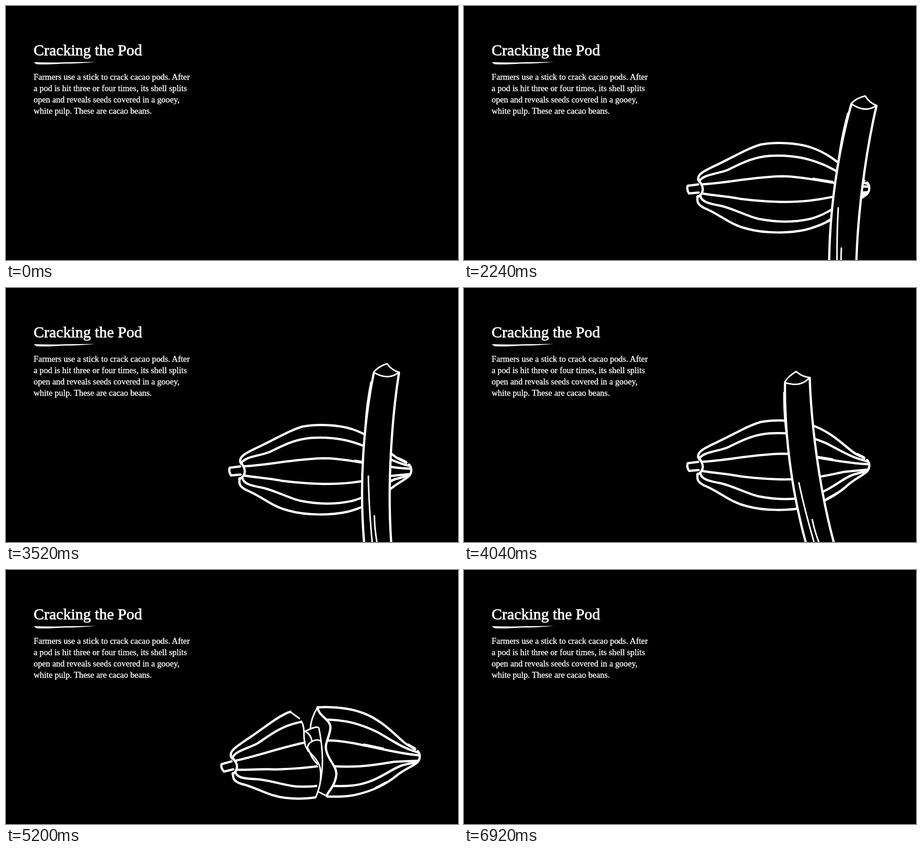
An HTML page that plays this animation: 998 by 561 pixels, repeating every 7480 ms.

```html
<!DOCTYPE html>
<html lang="en">
<head>
<meta charset="utf-8">
<title>Cracking the Pod</title>
<style>
  html, body { margin: 0; height: 100%; overflow: hidden; background: #000; }
  svg { display: block; width: 100vw; height: 100vh; }
  text { fill: #fff; stroke: #fff; stroke-width: .4; font: 18.8px "Liberation Serif", serif; }
  .title { font-size: 34.5px; stroke-width: .9; }
  .ink { fill: none; stroke: #fff; stroke-width: 5; stroke-linecap: round; stroke-linejoin: round; }
  .thin { stroke-width: 3.4; }
  .hair { stroke-width: 2; }
</style>
</head>
<body>
<svg viewBox="0 0 998 561">
  <defs>
    <g id="shell">
      <path d="M519 388C510 372 533 363 560 350C600 331 625 315 655 306C690 300 735 302 765 312C815 328 845 365 866 377L884 386"/>
      <path d="M520 386C530 372 555 372 580 363C610 349 635 334 675 331C730 328 765 338 800 353C830 368 855 385 892 393"/>
      <path d="M524 394C580 391 640 377 703 376C760 377 830 397 892 399"/>
      <path d="M526 414C545 418 580 420 610 426C660 432 700 434 735 432C780 430 810 422 840 416L892 411"/>
      <path d="M522 420C525 434 545 437 570 442C600 450 625 464 650 470C690 478 730 478 765 470C810 458 835 430 860 422L890 414"/>
      <path d="M516 420C514 432 515 438 530 446C565 460 585 482 625 492C665 503 720 502 755 494C800 482 825 464 842 450C860 432 880 425 890 415"/>
      <path d="M517 394L494 397Q491 405 497 414L518 412M517 383Q529 398 527 408Q524 419 515 422M890 390Q897 398 894 408Q892 414 887 417"/>
      <path class="hair" d="M770 380L814 387M868 375L884 383M800 475L824 461"/>
    </g>
    <clipPath id="leftCut">
      <path d="M400 250H627L630 316L652 334L659 380L692 440L684 502V560H400Z"/>
    </clipPath>
    <clipPath id="rightCut">
      <path d="M688 290V303C690 325 720 330 716 352C712 375 702 385 708 402C715 425 732 435 729 455C725 480 710 490 708 499V520H960V290Z"/>
    </clipPath>
  </defs>

  <text class="title" x="61" y="109">Cracking the Pod</text>
  <path fill="#fff" d="M61 124Q95 125.500 130 124.300L199 123.500Q165 127 125 127.300Q90 130 67 128.500Z"/>
  <text x="61" y="163">Farmers use a stick to crack cacao pods. After</text>
  <text x="61" y="188">a pod is hit three or four times, its shell splits</text>
  <text x="61" y="213">open and reveals seeds covered in a gooey,</text>
  <text x="61" y="238">white pulp. These are cacao beans.</text>

  <g id="pod" class="ink"><use href="#shell"/></g>

  <g id="left" class="ink">
    <g clip-path="url(#leftCut)"><use href="#shell" transform="translate(-16 27) rotate(-8.5 526 414)"/></g>
    <path class="thin" d="M627 313L648 328M652 334C662 350 655 370 660 380C658 400 690 412 694 440C697 465 692 482 684 502"/>
    <path class="thin" d="M663 355Q690 342 691 350Q701 400 698 440L695 464M660 356Q673 363 675 376M667 400Q662 384 679 377Q690 373 696 379M668 396Q674 416 688 429"/>
  </g>

  <g id="right" class="ink">
    <g clip-path="url(#rightCut)"><use href="#shell" transform="translate(19 0) rotate(2.9 691 400)"/></g>
    <path d="M688 303C690 325 720 330 716 352C712 375 702 385 708 402C715 425 732 435 729 455C725 480 710 490 708 499"/>
    <path class="thin" d="M688 303Q673 328 672 350M690 490L708 499"/>
  </g>

  <g id="stick" class="ink">
    <path fill="#000" stroke="none" d="M851 183Q862 171 882 166Q893 181 907 187C888 270 859 440 863 600V900H804V600C797 430 825 280 851 183"/>
    <path d="M851 186C825 280 797 430 804 600V900M907 188C888 270 859 440 863 600V900"/>
    <path class="thin" d="M823 413Q819 480 821 570V900M830 502Q828 530 832 570"/>
    <path class="hair" d="M843 204Q829 255 823 305"/>
    <path class="thin" d="M851 183Q862 171 882 166Q891 181 907 187Q882 205 851 183"/>
  </g>
</svg>
<script>
const LOOP = 7480, STEP = 40, MOVE = 760;
const ENTER_STICK = 1240, REAR = 2200, HITS = [2960, 3720, 4480], SPLIT = 4780, LEAVE = 6120;
const REARED = 9.6, SWING = 25.5;
const [pod, left, right, stick] = ["pod", "left", "right", "stick"].map(id => document.getElementById(id));

const progress = (t, start, length = MOVE) => Math.min(1, Math.max(0, (t - start) / length));
const backIn = (p, s) => p * p * ((s + 1) * p - s);
const backOut = (p, s) => 1 - backIn(1 - p, s);
const smooth = p => p * p * (3 - 2 * p);

function place(node, visible, transform) {
  node.style.display = visible ? "" : "none";
  node.setAttribute("transform", transform);
}

// Fast blow to the left, then a soft return to the reared pose.
function strikeAngle(p, returns) {
  const blow = p < .5 ? 1 - (1 - 2 * p) ** 2 : returns ? 1 - smooth(2 * p - 1) : 1;
  return REARED - SWING * blow;
}

function stickPose(t) {
  let angle = 0, x = 3, y = 33;
  if (t < REAR) {
    y += 451 * (1 - backOut(progress(t, ENTER_STICK), 1.3));
  } else {
    const raised = smooth(progress(t, REAR));
    angle = REARED * raised;
    x *= 1 - raised;
    y *= 1 - raised;
    const hit = HITS.findLast(start => t >= start);
    if (hit) angle = strikeAngle(progress(t, hit), hit !== HITS[2]);
    y -= 1.1 * Math.max(angle, 0);
    y += 480 * progress(t, SPLIT, 380) ** 2;
  }
  const length = 1 + .0022 * Math.min(angle, 0);
  return `translate(${x} ${y}) rotate(${angle} 877 729) translate(0 ${166 * (1 - length)}) scale(1 ${length})`;
}

function draw(time) {
  const t = Math.floor(time % LOOP / STEP) * STEP;
  const drop = -520 * (1 - backOut(progress(t, 0), .6));
  const jump = HITS.reduce((sum, start) => sum - 10 * Math.sin(Math.PI * progress(t, start + 160, 320)), 0);
  place(pod, t > 0 && t < SPLIT, `translate(0 ${drop + jump})`);

  // The halves are drawn open; "closed" turns them back into the whole pod.
  const split = t >= SPLIT && t < LEAVE + MOVE + STEP;
  const closed = 1 - backOut(progress(t, SPLIT, 400), 1);
  const exit = -1119 * backIn(progress(t, LEAVE), 1.3);
  place(left, split, `translate(${exit}) rotate(${8.5 * closed} 526 414) translate(${16 * closed} ${-27 * closed})`);
  place(right, split, `translate(${exit}) rotate(${-2.9 * closed} 691 400) translate(${-19 * closed})`);

  place(stick, t > ENTER_STICK && t < SPLIT + 400, stickPose(t));
}

const began = performance.now();
function tick() {
  draw(performance.now() - began);
  requestAnimationFrame(tick);
}
tick();
</script>
</body>
</html>
```
